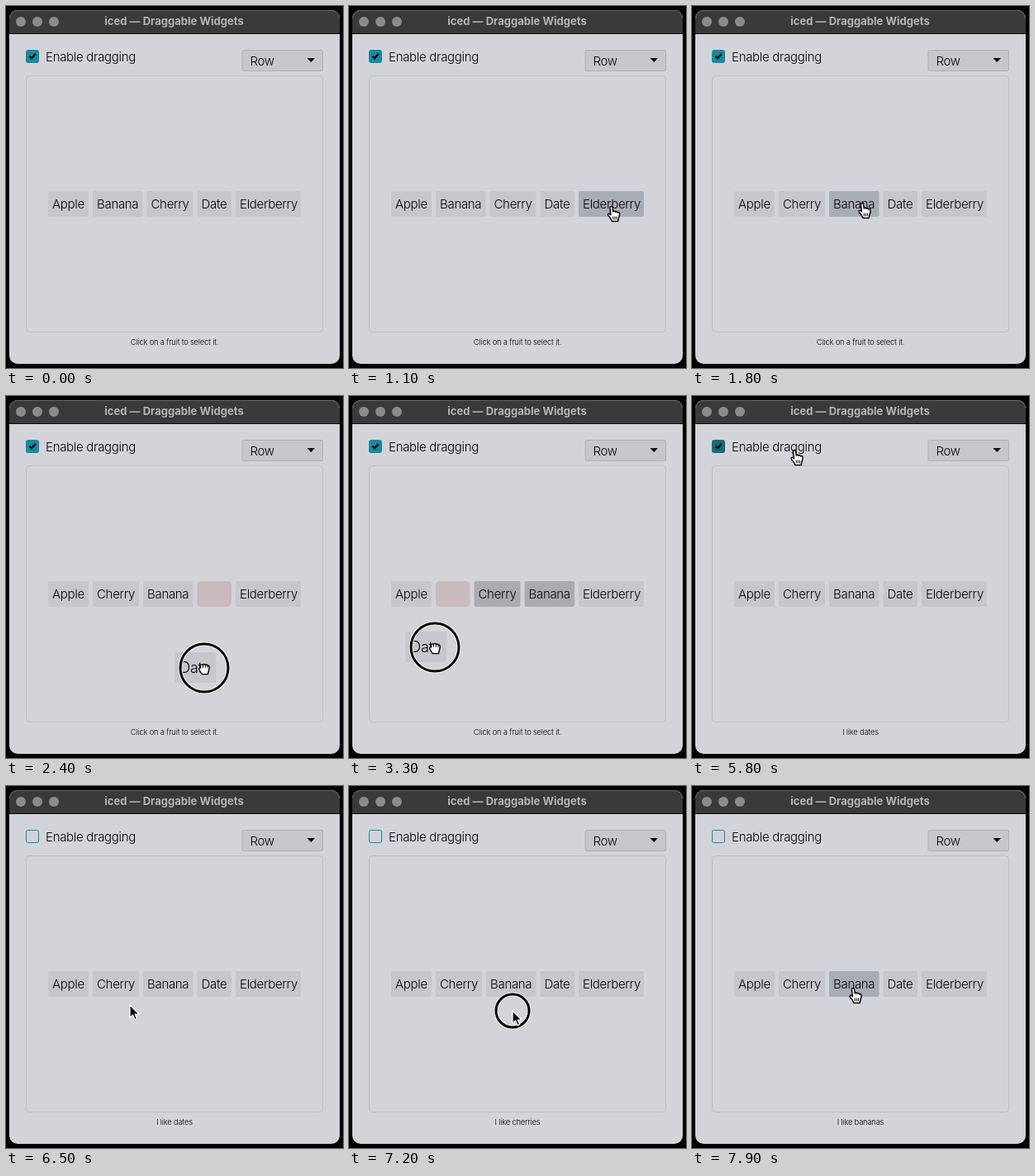
An HTML page for the animation above (8000 ms loop, 408 by 438 pixels).

```html
<!DOCTYPE html>
<html lang="en">
<head>
<meta charset="utf-8">
<title>Draggable Widgets</title>
<style>
  html, body { margin: 0; width: 100%; height: 100%; overflow: hidden; background: #030303; }
  svg { display: block; width: 408px; height: 438px; }
  text { font: 300 15px Inter, "Noto Sans", sans-serif; letter-spacing: -.3px; fill: #08080a; white-space: pre; }
  .title { font-size: 13px; font-weight: 700; letter-spacing: .03px; fill: #b4b4b4; }
  .note { font-size: 9.4px; letter-spacing: -.2px; }
</style>
</head>
<body>
<svg viewBox="0 0 408 438">
  <defs>
    <path id="arrow" d="M0 0V15.2L3.5 12 6 17.6 8.6 16.5 6.2 11H11Z"
      fill="#0a0a0a" stroke="#fff" stroke-width="1.2" stroke-linejoin="round"/>
    <g id="hand" fill="#fff" stroke="#080808" stroke-width="1.5" stroke-linejoin="round" stroke-linecap="round">
      <path d="M-1.6 1C-1.6-.9 1.4-.9 1.6 1L2.2 6C2.8 4.6 4.8 4.8 5 6.3 5.7 5.2 7.5 5.5 7.7 7 8.6 6.1 10.1 6.7 10.1 8.4 10.1 12 8.5 13.2 8.2 17.4H.7C.2 14.5-1.3 13.3-3.3 11-5.1 8.7-3.1 7.4-1.5 8.8L-.6 9.8Z"/>
      <path d="M2.3 12V15M4.4 12V15M6.5 12V15" fill="none" stroke-width="1"/>
    </g>
    <g id="fist" fill="#fff" stroke="#080808" stroke-width="1.4" stroke-linejoin="round" stroke-linecap="round">
      <path d="M-4.6-2.6C-4.2-4.6-2-4.5-1.6-3.2-1.2-5 1-5 1.4-3.2 2-4.6 3.9-4.2 4.1-2.6 5.1-3.3 6.3-2.6 6.2-1 6.2 3 4.6 4.3 4.5 7.6H-3C-3.4 5.4-5.6 4.4-6.2 1.8-6.5 0-5.4-.8-4.3 0Z"/>
      <path d="M-1.6-3V-.5M1.4-3V-.5M4.1-2.4V-.2" fill="none" stroke-width="1"/>
    </g>
  </defs>
  <rect x="4" y="5" width="400" height="428" rx="10" fill="#d2d4d9"/>
  <path d="M4 34V15A10 10 0 0 1 14 5H394A10 10 0 0 1 404 15V34Z" fill="#3a3a3a"/>
  <path d="M4.500 15A9.500 9.500 0 0 1 14 5.500H394A9.500 9.500 0 0 1 403.500 15" fill="none" stroke="#666"/>
  <path d="M4 33.500H404" stroke="#0c0c0c"/>
  <g fill="#8b8b8b"><circle cx="18" cy="19" r="6"/><circle cx="38" cy="19" r="6"/><circle cx="58" cy="19" r="6"/></g>
  <text class="title" x="203.500" y="23" text-anchor="middle">iced — Draggable Widgets</text>
  <rect id="box" x="24.500" y="53.500" width="15" height="15" rx="2"/>
  <path id="tick" d="M28.400 60.700 31 63.300 35.700 57.900" fill="none" stroke="#080808" stroke-width="2.400"/>
  <text x="48" y="67">Enable dragging</text>
  <rect x="286" y="53.500" width="97.500" height="25" rx="1.500" fill="#c5c7cc" stroke="#afb1b6"/>
  <text x="295.500" y="72">Row</text>
  <path d="M364.500 63H374L369.250 68Z" fill="#080808"/>
  <rect x="24.500" y="84.500" width="359" height="310" rx="4" fill="none" stroke="#bec0c5"/>
  <text id="note" class="note" x="204" y="410" text-anchor="middle"></text>
  <g id="row"></g>
  <g id="pointer"></g>
</svg>
<script>
const $ = id => document.getElementById(id);
const TICK = 100, LOOP = 8000;
const ROW = { y: 224, h: 31, gap: 5, left: 51 };
const widths = { Apple: 49, Banana: 60.5, Cherry: 56, Date: 41.5, Elderberry: 79 };

function layout(order) {
  let x = ROW.left;
  return order.map(name => {
    const item = { name, x, w: widths[name] };
    x += item.w + ROW.gap;
    return item;
  });
}

const inside = (s, x, y, w, h) => s.x >= x && s.x <= x + w && s.y >= y && s.y <= y + h;
const fruitAt = s => layout(s.order).find(i => inside(s, i.x, ROW.y, i.w, ROW.h))?.name;
const onCheck = s => inside(s, 24, 53, 134, 16);
const dragging = s => s.grab && s.checked && Math.hypot(s.x - s.fromX, s.y - s.fromY) > 5;

// Order of the row while a fruit hangs over it
function preview(s) {
  const order = s.order.filter(n => n !== s.grab);
  const slot = layout(s.order).filter(i => i.x + i.w + ROW.gap / 2 < s.x).length;
  order.splice(slot, 0, s.grab);
  return order;
}

// The script below acts on this state and records one copy per tick.
const film = [];
const now = { x: -99, y: -99, down: 0, grab: null, checked: true,
  order: Object.keys(widths), note: 'Click on a fruit to select it.' };

function hold(ticks) {
  while (ticks-- > 0) {
    if (now.down) now.down++;
    film.push({ ...now });
  }
}

function move(ticks, x, y) {
  const { x: x0, y: y0 } = now;
  for (let i = 1; i <= ticks; i++) {
    now.x = x0 + (x - x0) * i / ticks;
    now.y = y0 + (y - y0) * i / ticks;
    hold(1);
  }
  Object.assign(now, { x, y });
}

function over(ticks, name, dx = 0) {
  const { x, w } = layout(now.order).find(i => i.name === name);
  move(ticks, x + w / 2 + dx, 243);
}

function press() {
  Object.assign(now, { down: 1, grab: fruitAt(now), fromX: now.x, fromY: now.y });
}

function release() {
  if (dragging(now)) now.order = preview(now);
  else if (now.grab && fruitAt(now) === now.grab) {
    now.note = 'I like ' + (now.grab + 's').replace('ys', 'ies').toLowerCase();
  } else if (onCheck(now)) now.checked = !now.checked;
  Object.assign(now, { down: 0, grab: null });
}

function click() {
  press();
  hold(2);
  release();
}

// Sweep along the row, then swap two fruits
hold(3);
move(0, 120, 381);
hold(1);
over(2, 'Apple');
over(4, 'Elderberry');
hold(2);
over(1, 'Banana', 3);
press();
hold(1);
move(3, 208, 240);
hold(1);
release();
move(1, 206, 239);
hold(2);

// Pull a fruit around and bring it home
move(0, 263, 240);
press();
hold(2);
move(2, 240, 329);
hold(5);
move(4, 104, 304);
hold(1);
move(3, 264, 290);
release();

// Select fruits
over(2, 'Elderberry', -18);
hold(1);
click();
over(3, 'Banana', -15);
hold(2);
click();
over(1, 'Cherry');
click();
over(1, 'Date');
click();

// Switch dragging off and select again
move(1, 320, 86);
move(2, 124, 66);
move(2, 45, 62);
press();
release();
hold(1);
move(4, 150, 265);
over(1, 'Cherry', 7);
click();
over(1, 'Banana');
over(1, 'Date');
move(1, 198, 272);
click();
over(0, 'Banana', 20);
click();
move(4, 195, 245);

const button = ({ name, x, w }, fill) =>
  `<rect x="${x}" y="${ROW.y}" width="${w}" height="${ROW.h}" rx="2" fill="${fill}"/>` +
  `<text x="${x + 5}" y="245">${name}</text>`;

function drawRow(s) {
  const held = dragging(s), hover = fruitAt(s);
  const order = held ? preview(s) : s.order;
  let html = layout(order).map((item, i) => {
    if (held && item.name === s.grab) {
      return `<rect x="${item.x}" y="${ROW.y}" width="${item.w}" height="${ROW.h}" rx="5" fill="#cab9bd"/>`;
    }
    if (held) return button(item, item.name === s.order[i] ? '#c5c7cc' : '#aaabb0');
    return button(item, item.name === hover ? '#a8acb4' : '#c5c7cc');
  }).join('');
  if (held) {
    const item = layout(s.order).find(i => i.name === s.grab);
    const cx = item.x + item.w / 2, cy = ROW.y + ROW.h / 2;
    const x = cx + s.x - s.fromX, y = cy + s.y - s.fromY;
    html += `<g transform="translate(${x} ${y}) scale(1.2) translate(${-cx} ${-cy})">${button(item, '#c5c7cc')}</g>`;
  }
  $('row').innerHTML = html;
}

function drawPointer(s) {
  const radius = s.down > 2 ? 29 : 20;
  const ring = (color, width) =>
    `<circle r="${radius}" fill="none" stroke="${color}" stroke-width="${width}"/>`;
  const shape = dragging(s) ? 'fist' : fruitAt(s) || onCheck(s) ? 'hand' : 'arrow';
  $('pointer').innerHTML = `<g transform="translate(${s.x} ${s.y})">` +
    (s.down ? ring('#f4f5f6', 5) + ring('#050505', 3) : '') + `<use href="#${shape}"/></g>`;
}

function draw(s) {
  const teal = onCheck(s) ? '#116b78' : '#168ba0';
  const empty = onCheck(s) ? '#c5c7cc' : '#d2d4d9';
  $('box').setAttribute('fill', s.checked ? teal : empty);
  $('box').setAttribute('stroke', s.checked ? teal : '#168ba0');
  $('tick').style.display = s.checked ? '' : 'none';
  $('note').textContent = s.note;
  drawRow(s);
  drawPointer(s);
}

const start = performance.now();
let last = -1;
function frame() {
  const k = Math.floor((performance.now() - start) % LOOP / TICK);
  if (k !== last) draw(film[Math.min(last = k, film.length - 1)]);
  requestAnimationFrame(frame);
}
frame();
</script>
</body>
</html>
```
